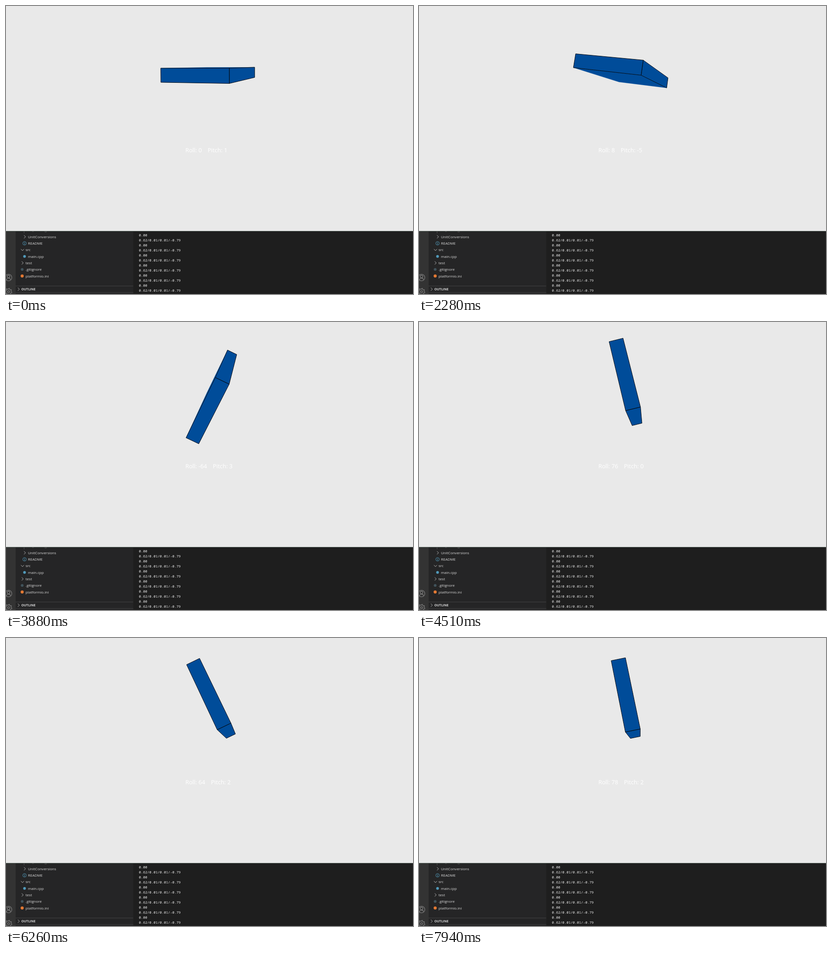
These frames come from a looping animation (889 px wide and 630 px high, 8000 ms). An HTML page with a canvas:

```html
<!DOCTYPE html>
<html lang="en">
<head>
<meta charset="utf-8">
<title>Roll and pitch</title>
<style>
  html, body { margin: 0; width: 100%; height: 100%; overflow: hidden; background: #e9e9e9; }
  canvas { display: block; }
</style>
</head>
<body>
<canvas id="stage" width="889" height="630"></canvas>
<script>
const ctx = document.getElementById('stage').getContext('2d');
const LOOP = 8000;
const UI = '"Open Sans", "Noto Sans", sans-serif';
const MONO = '"Noto Sans Mono", "DejaVu Sans Mono", monospace';

// Camera and box, in scene units
const CX = 457.4, CY = 147.8, SCALE = 0.647, EYE = 935;
const HALF = [100, 20, 193];

// Turning points as [ms, degrees], joined by cosine easing
const ROLL = [[2110, -0.2], [3000, 94.5], [3330, 94.5], [3920, -66], [4620, 85],
  [5450, -67], [6540, 88], [7240, -65], [8050, 85]];
const PITCH = [[1740, 1.6], [2280, -5.5], [3270, 7.2], [4510, 0.3], [6260, 2.1], [7290, 5.5], [7940, 2.5]];
const YAW = [[2280, -17.8], [3270, -19], [4510, -13.9], [6260, -13.5], [7290, -17], [7940, -12]];

const rad = deg => deg * Math.PI / 180;

function ease(points, t) {
  const next = points.findIndex(p => p[0] > t);
  if (next === 0) return points[0][1];
  if (next < 0) return points[points.length - 1][1];
  const [t0, a] = points[next - 1], [t1, b] = points[next];
  return a + (b - a) * (1 - Math.cos(Math.PI * (t - t0) / (t1 - t0))) / 2;
}

function poseAt(t) {
  return { roll: ease(ROLL, t), pitch: ease(PITCH, t), yaw: ease(YAW, t) };
}

function turn(a, b, deg) {
  const c = Math.cos(rad(deg)), s = Math.sin(rad(deg));
  return [a * c - b * s, a * s + b * c];
}

function project(corner, pose) {
  let [x, y, z] = corner.map((side, i) => side * HALF[i]);
  [z, x] = turn(z, x, pose.yaw);
  [x, y] = turn(x, y, pose.roll);
  [y, z] = turn(y, z, -pose.pitch);
  const k = SCALE * EYE / (EYE - z);
  return [CX + x * k, CY + y * k];
}

// Corners run clockwise seen from outside; top and bottom (axis 1) come first
function makeFace(axis, side) {
  return [[-1, -1], [1, -1], [1, 1], [-1, 1]].map(([u, v]) => {
    const p = [];
    p[axis] = side;
    p[(axis + 1) % 3] = u * side;
    p[(axis + 2) % 3] = v;
    return p;
  });
}
const FACES = [1, 0, 2].flatMap(axis => [-1, 1].map(side =>
  ({ outlined: axis !== 1, corners: makeFace(axis, side) })));

function path(pts, close) {
  ctx.beginPath();
  pts.forEach(([x, y], i) => i ? ctx.lineTo(x, y) : ctx.moveTo(x, y));
  if (close) ctx.closePath();
}

function stroke(color, width) {
  ctx.strokeStyle = color;
  ctx.lineWidth = width;
  ctx.stroke();
}

function facesViewer([a, b, c]) {
  return (b[0] - a[0]) * (c[1] - b[1]) - (b[1] - a[1]) * (c[0] - b[0]) > 0;
}

function drawBox(pose) {
  const blue = '#004c99';
  ctx.lineJoin = 'round';
  for (const { outlined, corners } of FACES) {
    const pts = corners.map(p => project(p, pose));
    if (!facesViewer(pts)) continue;
    path(pts, true);
    ctx.fillStyle = blue;
    ctx.fill();
    stroke(outlined ? '#000' : blue, outlined ? 0.9 : 0.3);
  }
}

function label(str, x, y, font, color) {
  ctx.font = font;
  ctx.fillStyle = color;
  ctx.fillText(str, x, Math.round(y));
}

function drawReadout(pose) {
  const font = '12.7px ' + UI;
  const roll = 'Roll: ' + (pose.roll | 0);
  label(roll, 391.8, 320, font, '#fff');
  label('Pitch: ' + (pose.pitch | 0), 391.8 + ctx.measureText(roll).width + 12.8, 320, font, '#fff');
}

function drawPointer() {
  path([[830.5, 478.5], [830.5, 489], [833, 486.8], [834.6, 490.5], [836, 490], [834.5, 486.3], [837.7, 486]], true);
  ctx.fillStyle = '#fff';
  ctx.fill();
  stroke('#000', 0.6);
}

function rect(x, y, w, h, color) {
  ctx.fillStyle = color;
  ctx.fillRect(x, y, w, h);
}

function disc(x, y, r, color) {
  ctx.beginPath();
  ctx.arc(x, y, r, 0, 7);
  ctx.fillStyle = color;
  ctx.fill();
}

function arc(x, y, r, color, width, from = 0, to = 2 * Math.PI) {
  ctx.beginPath();
  ctx.arc(x, y, r, from, to);
  stroke(color, width);
}

function chevron(x, y, open) {
  path([-1, 0, 1].map(i => {
    const along = 3.4 * i, tip = 1.7 - 3.4 * Math.abs(i);
    return open ? [x + along, y + tip] : [x + tip, y + along];
  }));
  stroke('#c8c8c8', 0.9);
}

function drawActivityBar() {
  const grey = '#858585', x = 5.5;
  arc(x, 594, 7.3, grey, 1.1);
  arc(x, 591.8, 2.9, grey, 1.1);
  arc(x, 600, 4.8, grey, 1.1, Math.PI * 1.08, Math.PI * 1.92);

  const gear = Array.from({ length: 32 }, (_, i) => {
    const a = (i + 0.5) * Math.PI / 16, r = i % 4 < 2 ? 7.5 : 5.4;
    return [x + r * Math.cos(a), 625 + r * Math.sin(a)];
  });
  path(gear, true);
  stroke(grey, 1.1);
  arc(x, 625, 2.2, grey, 1.1);
}

function infoIcon(x, y, color) {
  arc(x, y, 3.8, color, 0.9);
  rect(x - 0.5, y - 2.4, 1, 1, color);
  rect(x - 0.5, y - 0.6, 1, 3, color);
}

function drawSidebar() {
  const font = '8px ' + UI;
  const rowY = i => 504.9 + i * 14.28;
  const nested = 48, top = 42.8;
  label('lib_readings', nested, 493, font, '#777');
  rect(39, 493, 1, 4, '#505050');
  [['UnitConversions', nested], ['README', nested], ['src', top], ['main.cpp', nested],
    ['test', top], ['.gitignore', top], ['platformio.ini', top]]
    .forEach(([name, x], i) => label(name, x, rowY(i) + 3, font, '#dadada'));

  chevron(41, rowY(0), false);
  infoIcon(40.5, rowY(1), '#519aba');
  chevron(36, rowY(2), true);
  disc(40.5, rowY(3), 3, '#519aba');
  chevron(36, rowY(4), false);
  disc(35.3, rowY(5), 3, '#41535b');
  disc(35.3, rowY(6), 3.4, '#e37933');

  rect(21, 612, 257, 1, '#414142');
  rect(21, 626, 257, 1, '#414142');
  chevron(27.5, 619.5, false);
  label('OUTLINE', 33.5, 622, 'bold 7px ' + UI, '#dadada');
}

function drawTerminal() {
  for (let i = -1; i < 12; i++) {
    const line = i % 2 ? '0.62/0.01/0.01/-0.79' : '0.00';
    label(line, 290.3, 504 + i * 11.03, '500 7.6px ' + MONO, '#ececec');
  }
}

function drawEditor() {
  rect(0, 492, 889, 1, '#5c6862');
  ctx.save();
  ctx.beginPath();
  ctx.rect(0, 493, 889, 137);
  ctx.clip();
  rect(0, 493, 21, 137, '#333333');
  rect(21, 493, 257, 137, '#252526');
  rect(278, 493, 611, 137, '#1e1e1e');
  drawActivityBar();
  drawSidebar();
  drawTerminal();
  ctx.restore();
}

function draw(t) {
  const pose = poseAt(t);
  rect(0, 0, 889, 492, '#e9e9e9');
  drawReadout(pose);
  drawBox(pose);
  if (t >= 70 && t < 130) drawPointer();
  drawEditor();
}

const begin = performance.now();
function loop() {
  draw((performance.now() - begin) % LOOP);
  requestAnimationFrame(loop);
}
loop();
</script>
</body>
</html>
```
